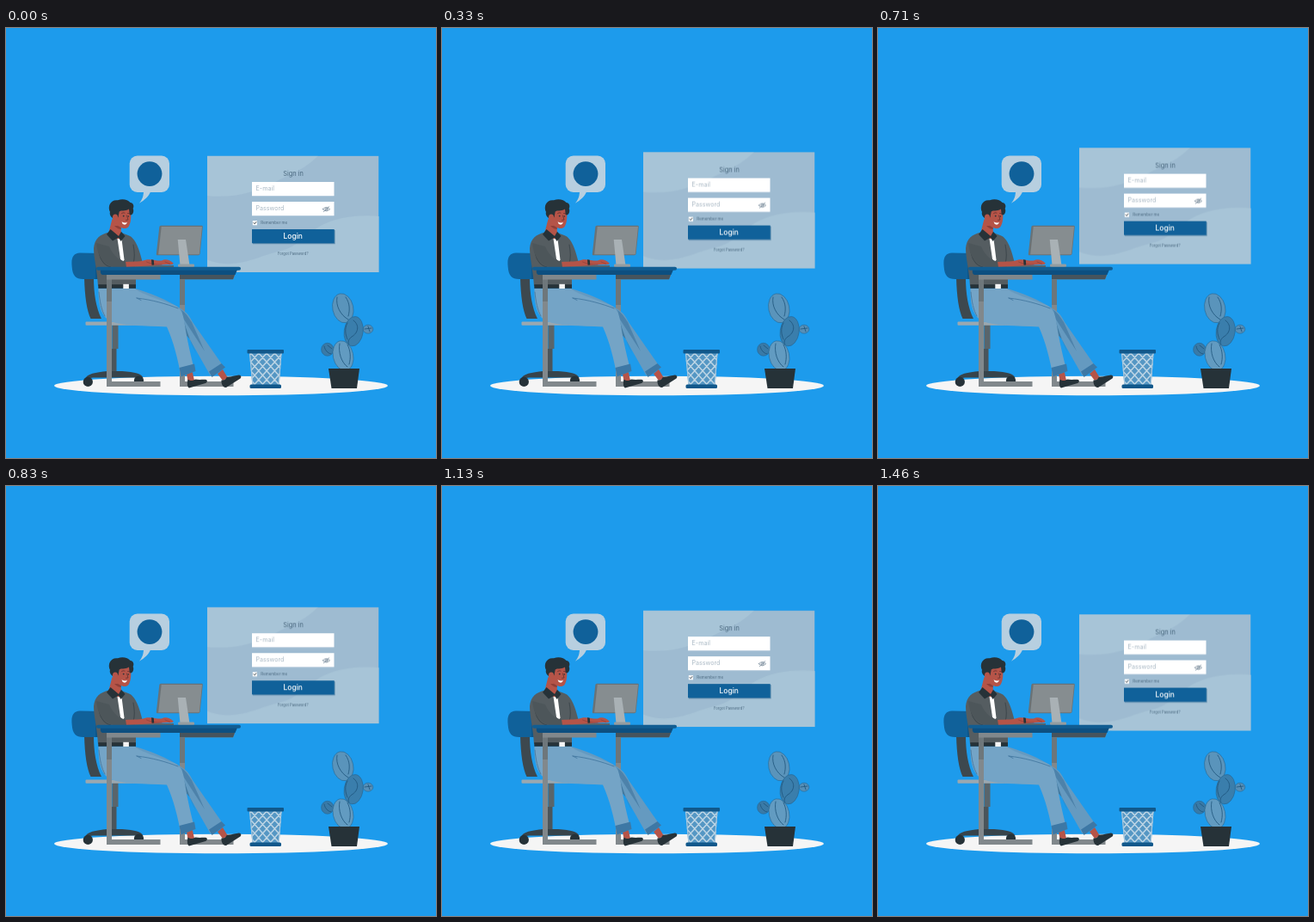
Animation of 500x500 px, one loop 1.5 s. Source, as an HTML page:

```html
<!DOCTYPE html>
<html lang="en">
<head>
<meta charset="utf-8">
<title>Sign in</title>
<style>
  html, body { margin: 0; width: 100%; height: 100%; overflow: hidden; background: #1d9bec; }
  svg { display: block; width: 100vw; height: 100vh; }
  text { font-family: Inter, "Open Sans", sans-serif; }
  .mid { text-anchor: middle; }
  .ink { fill: #263238; }
  .navy { fill: #10619a; }
  .skin { fill: #b55448; }
  .steel { fill: #81888c; }
  .line { fill: none; stroke-linecap: round; stroke-linejoin: round; }
</style>
</head>
<body>
<svg viewBox="0 0 500 500">
  <defs>
    <clipPath id="screen"><rect x="234" y="149" width="199.5" height="135.5"/></clipPath>
    <clipPath id="bin"><path d="M283 378H320.5L317.5 416H286.5Z"/></clipPath>
  </defs>

  <rect width="500" height="500" fill="#1d9bec"/>
  <ellipse cx="250" cy="416" rx="194" ry="11.3" fill="#f5f5f5"/>

  <!-- login panel -->
  <g id="panel">
    <g clip-path="url(#screen)">
      <rect x="234" y="149" width="199.5" height="135.5" fill="#9ebbd1"/>
      <path d="M234 149H363C346 166 331 170 316 178C291 192 261 199 234 195.5Z" fill="#a7c4d7"/>
      <path d="M434 219.5C410 217 382 221 365 231C349 240 340 255 318 260C298 265 285 272 268 274C256 276 244 274 234 270V285H434Z" fill="#a7c4d7"/>
    </g>
    <text class="mid" x="334" y="173" font-size="7.4" fill="#4c6a80">Sign in</text>
    <path d="M286 179.5h95.5v16.3H286zM286 202.6h95.5v16.3H286z" fill="#fff"/>
    <text x="290.5" y="189.7" font-size="7.2" fill="#a9b8c4">E-mail</text>
    <text x="290.5" y="213" font-size="7.1" fill="#a9b8c4">Password</text>
    <g class="line" stroke="#76899a" stroke-width=".8">
      <path d="M368.4 211.2Q372.5 206.8 376.6 211.2Q372.5 215.6 368.4 211.2ZM369.3 214.2L375.8 208.2"/>
      <circle cx="372.5" cy="211.2" r="1.4"/>
    </g>
    <rect x="286.8" y="224.6" width="5.2" height="5.2" fill="#fff"/>
    <path class="line" d="M288 227.1l1.1 1.2 1.9-2.3" stroke="#263238" stroke-width=".9"/>
    <text x="296.3" y="228.8" font-size="4.5" fill="#4c6a80">Remember me</text>
    <rect x="287" y="235.6" width="95.7" height="16.2" fill="#40749a" opacity=".65"/>
    <rect class="navy" x="286" y="234.6" width="95.7" height="16.2"/>
    <text class="mid" x="333.7" y="245.4" font-size="8.5" font-weight="500" fill="#fff">Login</text>
    <text class="mid" x="333.8" y="264.2" font-size="4.2" fill="#4c6a80">Forgot Password?</text>
  </g>

  <!-- speech bubble -->
  <g fill="#b7cfe0">
    <rect x="143.7" y="148.5" width="46.3" height="42.5" rx="9"/>
    <path d="M160 189.5C160 196 158 200 155 203.8C161 200 166 196 168.5 189.5Z"/>
  </g>
  <circle class="navy" cx="167" cy="169.6" r="14.4"/>

  <!-- chair -->
  <path d="M91 290C91.5 312 94 329 98.5 338H111C104.5 325 102 308 102 290Z" fill="#3d484e"/>
  <path class="navy" d="M86 261.5C78 262 75.5 267 76.7 278C77.5 288 81 292 90 292H110V262Z"/>
  <path d="M105 262V292" stroke="#0c4f80" stroke-width="1.2"/>
  <path d="M123.5 345h7v28h-7z" fill="#59656b"/>
  <path d="M122.5 373h6v28h-6z" fill="#4a555b"/>
  <path d="M92 408C94 402 104 400.5 118 399H135C150 400 158 402 159.5 407L152 406.5H101Z" fill="#37444b"/>
  <circle class="ink" cx="95.3" cy="411.4" r="5.6"/>
  <circle class="ink" cx="154.5" cy="410" r="5.6"/>
  <rect x="92.5" y="341.5" width="66.5" height="4.2" rx="1" fill="#9ba8b0"/>

  <!-- far desk leg -->
  <path d="M202 287.5H266L264 292.3H208V411H264.5V417H202Z" class="steel"/>
  <path d="M202 287H266L264 292.3H202Z" fill="#46545d"/>
  <path d="M202 292.3h6V322h-6z" fill="#6c767b"/>

  <!-- legs and shoes -->
  <path class="skin" d="M209.5 400L216.5 398.5L219 410H211.5ZM246 402L252 397L258 407L252 410Z"/>
  <path class="ink" d="M211.5 408.5C215 411 218 410 220 408.5C225 409.5 229 408.5 233 409C234.5 410 234 412.3 232 413L213 418.5C210.5 417.5 210.5 412 211.5 408.5Z"/>
  <path class="ink" d="M250.5 409.5C254 410 256 408 257 405.5C262 406 267 404 271 403.6C273.5 404 274 406 272.5 407.5L256 418C252 418.5 250 413 250.5 409.5Z"/>
  <path d="M150 303C165 307 188 316 205 327.5C211 331 214 336 217 342L252.5 393L237.5 404L204 345L152 342Z" fill="#659ac0"/>
  <path d="M203 327C206 340 214 365 221 378L214 362L198 345Z" fill="#43799f"/>
  <path d="M107.5 303H150C156 309 178 315 195 322C203 326 206 331 207 339C209 354 213 374 219.5 399L203.5 405C200 386 195 365 187 347.5C160 346 137 347 122 341C110 336 107 319 107.5 303Z" fill="#74a4c6"/>
  <path d="M207 339L204 328C211 333 213 338 216 342L231 376Z" fill="#4d82aa"/>
  <path d="M201.5 395L219 390.5L220.5 399L203.5 405.5ZM236 399.5L250.5 390L255 394.5L239.5 406Z" fill="#3d78a5"/>
  <path class="line" d="M152 314C170 316 187 321 200 326M152 314L157 316.5M108 307C109 318 111 328 115 335" stroke="#4479a1" stroke-width=".9"/>

  <!-- torso -->
  <path d="M120 237.5C109 240 103 245 102 256C102 268 106 281 107 300H151V281L159 273C155 258 151 244 142 241L134 238Z" fill="#555d61"/>
  <path d="M108 257C108 267 113 276 122 278M148 252C150 262 150 267 148 274" class="line" stroke="#3e484d" stroke-width="1.1"/>
  <path class="skin" d="M123.5 222L133.5 230L134 239L131 246L119.5 237.5Z"/>
  <path d="M126 230Q130 234 133.7 234V230Z" fill="#8f3f38"/>
  <path d="M129.5 245L134.5 245.5L137.5 269.5L135.8 272.5L133 268.5Z" fill="#fff"/>
  <path class="ink" d="M121.5 234L117 240L124 247.5L131 243.5L133.5 248L138.5 242L134 236.8L131 242Z"/>
  <rect class="ink" x="107.3" y="298.2" width="43.7" height="4.6"/>
  <rect x="136.3" y="297.8" width="6.6" height="5.2" fill="#f5f5f5"/>

  <!-- head -->
  <path class="skin" d="M125 208H144.5C146 218 145.5 226 142.5 231C139 235.5 131 232 127.5 227L125 222Z"/>
  <path class="ink" d="M121 214C117.5 207 122 199 130 200.3C136 198 142 200 144.5 203C148 203 149.3 207 147.7 210C149.5 214 146.5 219 143.7 217L143 210.5C138 213.5 134 211.5 131.7 213.5L130.5 220L126 222.5C122 220 120 217 121 214Z"/>
  <ellipse class="skin" cx="127" cy="220.5" rx="3.1" ry="3.9"/>
  <path class="line" d="M134.5 215.5Q136 214 138 215M141.5 215.5L143.6 215.8M140.5 218L142 223L139.5 223.4" stroke="#5b2a29" stroke-width=".7"/>
  <circle class="ink" cx="136.7" cy="218.6" r=".9"/>
  <circle class="ink" cx="142.3" cy="219" r=".8"/>
  <path d="M134.5 225.2Q138 227.2 141 226Q139.5 229.2 137.4 228.6Q135.2 228 134.5 225.2Z" fill="#fff"/>

  <!-- monitor and hands -->
  <path d="M180 229.8H227.5Q229 229.8 228.8 231.2L225.6 262.5Q225.4 264.3 223.7 264.3H176Q174.6 264.3 174.8 262.8L178.3 231.4Q178.5 229.8 180 229.8Z" fill="#697276"/>
  <path d="M180.7 231H228L224.8 263.2H177.2Z" fill="#868d90"/>
  <path d="M199.7 246H209L213.5 276H202.5Z" fill="#a9b1b5"/>
  <rect x="200" y="274.6" width="19" height="3.3" rx="1.2" fill="#949da1"/>
  <path d="M150 276h45v2h-45z" fill="#59656b"/>
  <path class="skin" d="M138.5 272C149 271.5 157 272 164 269.3C169 268.5 176 271 181 270.5C186 268 190 270 194.5 273.2C195 275 192 275.5 188 275L166 276.5L139 278Z"/>
  <path class="line" d="M163.5 272C169 274.5 175 275.5 181 275M185 272L190.5 274" stroke="#8f3f38" stroke-width=".7"/>
  <path class="ink" d="M169 269.3L171.8 269.8L172.2 275.5L169.6 275.7Z"/>
  <path d="M105 250C106 263 112 275 125 278H140L139 271.5C131 270 124 264 120 254Z" fill="#4d565a"/>

  <!-- desk -->
  <path class="steel" d="M117 287H179.5V292.5H123V411H179.5V417H117Z"/>
  <path d="M117 292.5h6V318h-6z" fill="#6e777b"/>
  <path d="M110 281H269L266.5 287H112Q109 286 110 281Z" fill="#0d4f80"/>
  <rect x="105" y="277.7" width="168" height="4.1" rx="2" fill="#115d92"/>

  <!-- waste bin -->
  <path d="M283 378H320.5L317.5 416H286.5Z" fill="#5597c4"/>
  <g clip-path="url(#bin)"><path id="mesh" class="line" stroke="#bdd5e5" stroke-width="1.5"/></g>
  <path class="line" d="M283.5 378L287 416M320 378L317 416" stroke="#a9c9df" stroke-width="1.2"/>
  <rect x="280.5" y="374" width="42.5" height="4.4" rx="1" fill="#10588b"/>
  <rect x="283.5" y="414.6" width="36.5" height="4.5" rx="1.5" fill="#10588b"/>

  <!-- cactus -->
  <g stroke="#245f89" stroke-width=".5">
    <ellipse cx="421" cy="350.2" rx="5.8" ry="5" fill="#568fb7"/>
    <ellipse cx="373.8" cy="373.8" rx="7.2" ry="7.5" fill="#397aa7"/>
    <ellipse cx="391.8" cy="325.8" rx="12" ry="17.2" transform="rotate(-12 391.8 325.8)" fill="#5a94bb"/>
    <ellipse cx="404.2" cy="352.7" rx="11" ry="17.3" transform="rotate(8 404.2 352.7)" fill="#3a7eac"/>
    <ellipse cx="392" cy="381" rx="11.7" ry="17.5" transform="rotate(-12 392 381)" fill="#629bc1"/>
  </g>
  <g class="line" stroke="#1d537a" stroke-width=".8">
    <path d="M385 313C383 323 389 334 398 339M395 313C400 320 400 328 398 335M404 340C412 346 409 355 402 359C398 362 397 366 399 368M397 343C393 350 395 357 397 362M388 367C386 377 390 389 397 394M397 368C401 376 401 384 399 391M370 370C371 375 374 378 378 379M374 369L379 373M417 350L425 349M421 347L423 353"/>
  </g>
  <path class="ink" d="M375 396H411L408 419H378.5Z"/>
</svg>
<script>
  const LOOP = 1500, STEPS = 36, RISE = 10;

  // triangle wave: 0 at both ends of the loop, -RISE halfway
  const lift = k => -RISE * (1 - Math.abs(2 * (k % STEPS) / STEPS - 1));

  const frames = Array.from({ length: STEPS + 1 }, (_, i) => ({
    offset: Math.round(i * LOOP / STEPS / 10) * 10 / LOOP,
    transform: `translateY(${lift(i + 1)}px)`,
    easing: 'steps(1, end)'
  }));
  document.getElementById('panel').animate(frames, { duration: LOOP, iterations: Infinity });

  let mesh = '';
  for (let x = 238; x < 366; x += 9.3) mesh += `M${x} 378l36 40M${x} 378l-36 40`;
  document.getElementById('mesh').setAttribute('d', mesh);
</script>
</body>
</html>
```
